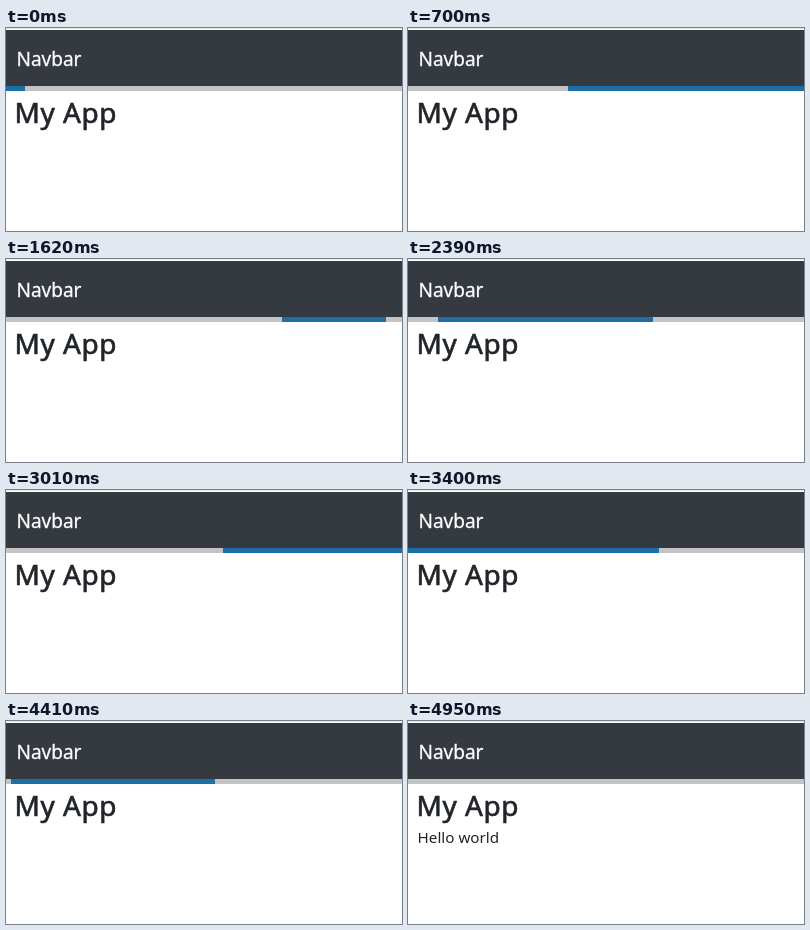
An HTML page that plays this animation: 396x203 px, repeating every 6220 ms.

```html
<!DOCTYPE html>
<html lang="en">
<head>
<meta charset="utf-8">
<title>My App</title>
<style>
  html, body { margin: 0; width: 100%; height: 100%; overflow: hidden; background: #fff; }
  #stage { position: relative; width: 396px; height: 203px; overflow: hidden; background: #fff; }
  #edge { position: absolute; inset: 0 0 auto; height: 1px; background: #e6eae7; }
  #nav { position: absolute; left: 0; top: 2px; width: 396px; height: 56px; background: #343a40; }
  #track { position: absolute; left: -5px; top: 58px; width: 407px; height: 5px; overflow: hidden; background: #c4c4c4; }
  .bar { position: absolute; top: 0; bottom: 0; background: #1c6ea4; }
  svg { position: absolute; left: 0; top: 0; }
  text { font-family: "Segoe UI", "Open Sans", "Noto Sans", sans-serif; fill: currentColor; stroke: currentColor; stroke-width: 0; color: #212529; }
  #brand { font-size: 19px; color: #fff; stroke-width: 0.3px; }
  #title { font-size: 28px; letter-spacing: 0.5px; stroke-width: 0.65px; }
  #hello { font-size: 15.2px; }
</style>
</head>
<body>
<div id="stage">
  <div id="edge"></div>
  <div id="nav"></div>
  <div id="track"><div class="bar" id="long"></div><div class="bar" id="short"></div></div>
  <svg width="396" height="203">
    <text id="brand" x="10.5" y="38">Navbar</text>
    <text id="title" x="8.6" y="95">My App</text>
    <text id="hello" x="9.6" y="122">Hello world</text>
  </svg>
</div>
<script>
const LOOP = 6220, TICK = 77.3, LEAD = 8, LAST = 64, CYCLE = 2100;

// The bar's own clock at a few screen updates: [update, ms]
const clock = [[0, 32], [9, 767], [39, 3083], [51, 4032], [LAST, 5060]];

function barTime(n) {
  const i = Math.max(1, clock.findIndex(([at]) => at >= n));
  const [a, x] = clock[i - 1], [b, y] = clock[i];
  return x + (y - x) * (n - a) / (b - a);
}

const el = id => document.getElementById(id);

function sweep(id, start, end, easing, delay) {
  const anim = el(id).animate(
    [{ ...start, easing }, { ...end, offset: 0.6 }, end],
    { duration: CYCLE, delay, iterations: Infinity, fill: "both" });
  anim.pause();
  return anim;
}

const sweeps = [
  sweep("long", { left: "-35%", right: "100%" }, { left: "100%", right: "-90%" },
    "cubic-bezier(0.65, 0.815, 0.735, 0.395)", 0),
  sweep("short", { left: "-200%", right: "100%" }, { left: "107%", right: "-8%" },
    "cubic-bezier(0.165, 0.84, 0.44, 1)", 1150)
];

function draw(t) {
  const update = Math.min(LAST, Math.floor((t + LEAD) / TICK));
  const loaded = update === LAST;
  for (const s of sweeps) {
    s.currentTime = barTime(update);
    s.effect.target.style.visibility = loaded ? "hidden" : "visible";
  }
  el("hello").style.visibility = loaded ? "visible" : "hidden";
}

const begin = performance.now();
function loop() {
  draw((performance.now() - begin) % LOOP);
  requestAnimationFrame(loop);
}
loop();
</script>
</body>
</html>
```
